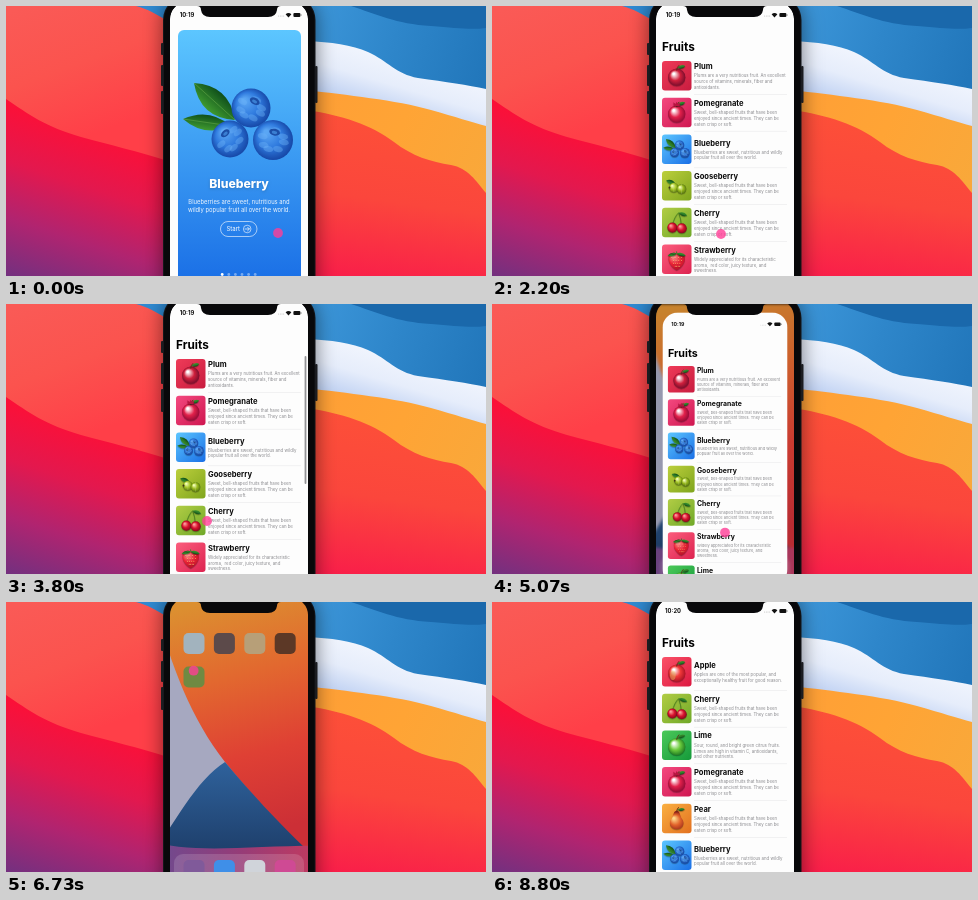
These frames come from a looping animation (480 px wide and 270 px high, 8.87 s). An HTML page with a canvas:

```html
<!DOCTYPE html>
<html lang="en">
<head>
<meta charset="utf-8">
<title>Fruits</title>
<style>
html, body { margin: 0; width: 100%; height: 100%; overflow: hidden; background: #111; }
canvas { display: block; width: 480px; height: 270px; }
</style>
</head>
<body>
<canvas id="stage"></canvas>
<script>
const W = 480, H = 270, LOOP = 8870;
const dpr = window.devicePixelRatio || 1;
const FONT = 'Inter, "Liberation Sans", sans-serif';
const stage = document.getElementById('stage');
const SCREEN = { x: 164, y: -4, w: 138, h: 300, r: 17 };
const MID = 233, ROW = 36.7, MAX_SCROLL = 235;

function layer(canvas, height) {
  canvas.width = W * dpr;
  canvas.height = height * dpr;
  const ctx = canvas.getContext('2d');
  ctx.scale(dpr, dpr);
  return ctx;
}
let c = layer(stage, H);
const main = c;

// ---------- timing ----------
const clamp = v => Math.max(0, Math.min(1, v));
const mix = (a, b, k) => a + (b - a) * k;
const inOut = k => k * k * (3 - 2 * k);
const span = (t, a, b) => clamp((t - a) / (b - a));
const glide = (t, a, b) => inOut(span(t, a, b));
const easeOut = (t, a, b) => 1 - Math.pow(1 - span(t, a, b), 3);

// keys: [time, value, value, ...]
function track(t, keys) {
  let i = 0;
  while (i < keys.length - 2 && t >= keys[i + 1][0]) i++;
  const a = keys[i], b = keys[i + 1], k = glide(t, a[0], b[0]);
  return a.slice(1).map((v, n) => mix(v, b[n + 1], k));
}

const PAGES = [[0, 0], [60, 0], [260, 82], [450, 140], [560, 140], [780, 222], [920, 280]];
const POINTER = [
  [60, 272, 227], [260, 192, 228], [310, 192, 228], [510, 272, 227], [560, 272, 227],
  [780, 192, 228], [1050, 192, 228], [1500, 229, 228], [2450, 229, 228], [2680, 224, 130],
  [3050, 205, 110], [3300, 201, 217], [4100, 201, 217], [4600, 233, 266], [4930, 233, 266],
  [5250, 233, 175], [5600, 226, 165], [5850, 224, 40], [6250, 224, 40], [6800, 186, 70], [8870, 186, 70]
];

// ---------- drawing helpers ----------
function ramp(x0, y0, x1, y1, ...cols) {
  const g = c.createLinearGradient(x0, y0, x1, y1);
  cols.forEach((col, i) => g.addColorStop(i / (cols.length - 1), col));
  return g;
}
function orb(x, y, r, ...cols) {
  const g = c.createRadialGradient(x - r * .35, y - r * .4, r * .1, x, y, r * 1.1);
  cols.forEach((col, i) => g.addColorStop(i / (cols.length - 1), col));
  return g;
}
function shape(d, fill) {
  c.fillStyle = fill;
  c.fill(new Path2D(d));
}
function line(d, color, width) {
  c.strokeStyle = color;
  c.lineWidth = width;
  c.lineCap = 'round';
  c.stroke(new Path2D(d));
}
function box(x, y, w, h, r, fill) {
  c.beginPath();
  c.roundRect(x, y, w, h, r);
  c.fillStyle = fill;
  c.fill();
}
function disc(x, y, r, fill, ry = r) {
  c.beginPath();
  c.ellipse(x, y, r, ry, 0, 0, 7);
  c.fillStyle = fill;
  c.fill();
}
function text(s, x, y, size, weight, color, align = 'left') {
  c.font = `${weight} ${size}px ${FONT}`;
  c.fillStyle = color;
  c.textAlign = align;
  c.textBaseline = 'middle';
  c.fillText(s, x, y);
}
function scoped(fn) {
  c.save();
  fn();
  c.restore();
}

// ---------- fruit ----------
function leaf(x0, y0, x1, y1, bulge, dark = '#0f4f1a', light = '#3f9a30') {
  const mx = (x0 + x1) / 2, my = (y0 + y1) / 2, dx = (y1 - y0) * bulge, dy = (x0 - x1) * bulge;
  shape(`M${x0} ${y0}Q${mx + dx} ${my + dy} ${x1} ${y1}Q${mx - dx} ${my - dy} ${x0} ${y0}`, ramp(mx + dx / 2, my + dy / 2, mx - dx / 2, my - dy / 2, light, dark));
  line(`M${x0} ${y0}L${x1} ${y1}`, 'rgba(150,210,100,.4)', .8);
}
function ball(col, dark, r = 36) {
  disc(0, 5, r, orb(0, 5, r, '#fff', col, dark));
  line('M0 -26Q2 -38 9 -44', '#5b3a1c', 4);
  leaf(4, -34, 36, -42, .45);
}
function berry(x, y, r, turn) {
  disc(x, y, r, orb(x, y, r, '#5aa6f4', '#2f7ade', '#123f9e'));
  scoped(() => {
    c.translate(x, y);
    c.rotate(turn);
    for (let i = 0; i < 7; i++) {
      const a = i * 2.4;
      disc(Math.cos(a) * r * .55, Math.sin(a) * r * .5, r * .25, 'rgba(110,180,248,.4)', r * .15);
    }
    disc(0, -r * .4, r * .27, '#1c4ea6', r * .17);
    disc(0, -r * .38, r * .14, '#3a7fd2', r * .08);
  });
}
const FRUIT = {
  Blueberry() {
    leaf(-4, -6, -45, -43, .4);
    leaf(-8, 0, -56, -7, .32);
    berry(12, -18, 19.5, .5);
    berry(-9, 13, 18.5, -.7);
    berry(34, 14, 20, .2);
  },
  Lemon() {
    disc(22, 33, 21, 'rgba(170,90,0,.22)', 7);
    shape('M13 -37C24 -36 32 -21 36 -8C42 12 37 30 24 37C17 40 14 39 9 40C5 39 0 39 -6 36C-19 29 -23 12 -18 -4C-13 -20 0 -35 13 -37Z',
      orb(10, 2, 40, '#ffd04a', '#ffb214', '#ea7c00'));
    disc(24, -14, 3.5, 'rgba(255,240,190,.6)', 6);
    line('M13 -37Q15 -41 14 -46', '#5a5a1c', 2.5);
    leaf(13, -38, -51, 14, .3, '#0b3d12', '#23752a');
  },
  Strawberry() {
    shape('M0 45C-25 32 -40 5 -32 -14C-24 -30 24 -30 32 -14C40 5 25 32 0 45Z', orb(0, 4, 42, '#ff8c8c', '#ec2436', '#a80a24'));
    for (let i = 0; i < 16; i++) disc((i % 4 - 1.5) * (14 - (i >> 2) * 2.6) + (i >> 2 & 1) * 3, -8 + (i >> 2) * 12, 1.5, '#ffd877', 2.2);
    [-38, -20, 0, 20, 38].forEach(x => leaf(0, -24, x, -16 - (40 - Math.abs(x)) * .5, .35));
  },
  Cherry() {
    line('M-18 10Q-10 -25 8 -42Q18 -20 20 14', '#3f7a1c', 3);
    leaf(8, -42, 44, -30, .4);
    disc(-18, 20, 21, orb(-18, 20, 21, '#ff9a9a', '#d8142e', '#77051a'));
    disc(21, 23, 21, orb(21, 23, 21, '#ff9a9a', '#d8142e', '#77051a'));
  },
  Gooseberry() {
    leaf(-4, -8, -44, -24, .4);
    disc(-12, 6, 20, orb(-12, 6, 20, '#f4ffb8', '#a9c927', '#597a10'));
    disc(20, 12, 20, orb(20, 12, 20, '#f4ffb8', '#98b91e', '#4d6d0c'));
    line('M-12 -12L-12 24M20 -6L20 30', 'rgba(240,255,190,.6)', 1.5);
    disc(-30, 6, 4, '#3d3416');
  },
  Pear() {
    shape('M0 -34C14 -34 13 -12 22 0C36 18 26 44 0 44C-26 44 -36 18 -22 0C-13 -12 -14 -34 0 -34Z', orb(0, 12, 36, '#ffd98a', '#e2632a', '#94261a'));
    line('M0 -32Q2 -42 7 -47', '#5b3a1c', 4);
    leaf(4, -38, 34, -40, .4);
  },
  Pomegranate() {
    ball('#e2214b', '#8c0733');
    shape('M-12 -28L-14 -44L-5 -36L0 -46L6 -36L14 -43L12 -28Z', '#b81440');
  },
  Plum() { ball('#d01f3c', '#6d0b2a'); },
  Apple() { ball('#f23a3a', '#a40d22'); disc(-16, 14, 12, 'rgba(255,214,110,.4)', 20); },
  Lime() { ball('#6ccb3d', '#17731f'); },
  Mango() { ball('#ffb52e', '#d85a16'); },
  Watermelon() { ball('#4fae3f', '#0d5420'); },
  Grapefruit() { ball('#ff8a5c', '#cf3a35'); }
};
const TINT = {
  Plum: ['#ef3b58', '#c81c3f'], Pomegranate: ['#f4497f', '#cf1650'], Blueberry: ['#5cc6ff', '#1a6fe6'],
  Gooseberry: ['#bccf3c', '#7fa51d'], Cherry: ['#b2cd45', '#6fa828'], Strawberry: ['#fb5d7d', '#dd2350'],
  Lime: ['#4cc95a', '#159a3a'], Lemon: ['#ffec38', '#ff9600'], Pear: ['#fab042', '#e2701f'],
  Apple: ['#fb5268', '#dc1840'], Mango: ['#ffc83d', '#f28a1c'], Watermelon: ['#6fcf68', '#1f9448'],
  Grapefruit: ['#ff9a77', '#ea4f4f']
};
const BELL = 'Sweet, bell-shaped fruits that have been|enjoyed since ancient times. They can be|eaten crisp or soft.';
const NOTE = {
  Plum: 'Plums are a very nutritious fruit. An excellent|source of vitamins, minerals, fiber and|antioxidants.',
  Blueberry: 'Blueberries are sweet, nutritious and wildly|popular fruit all over the world.',
  Strawberry: 'Widely appreciated for its characteristic|aroma,  red color, juicy texture, and|sweetness.',
  Apple: 'Apples are one of the most popular, and|exceptionally healthy fruit for good reason.',
  Lime: 'Sour, round, and bright green citrus fruits.|Limes are high in vitamin C, antioxidants,|and other nutrients.',
  Lemon: "There's no doubt lemons are delicious, but|does adding them to water make you|healthier?"
};
const CARDS = [
  ['Blueberry', 'Blueberries are sweet, nutritious and|wildly popular fruit all over the world.'],
  ['Strawberry', NOTE.Strawberry],
  ['Lemon', "There's no doubt lemons are delicious,|but does adding them to water make|you healthier?"]
];
const FIRST = ['Plum', 'Pomegranate', 'Blueberry', 'Gooseberry', 'Cherry', 'Strawberry', 'Lime',
  'Lemon', 'Pear', 'Apple', 'Mango', 'Watermelon', 'Grapefruit'];
const SECOND = ['Apple', 'Cherry', 'Lime', 'Pomegranate', 'Pear', 'Blueberry', 'Plum'];

// ---------- app ----------
function card([name, note], x, grow) {
  const lines = note.split('|'), tall = lines.length > 2;
  scoped(() => {
    c.translate(x, 0);
    box(172, 24, 123, 264, 6, ramp(0, 24, 0, 275, ...TINT[name]));
    scoped(() => {
      c.translate(MID, tall ? 117 : 120);
      c.scale(grow, grow);
      FRUIT[name]();
    });
    scoped(() => {
      c.shadowColor = 'rgba(0,0,0,.2)';
      c.shadowBlur = 3 * dpr;
      c.shadowOffsetY = dpr;
      text(name, MID, tall ? 174 : 178, 12.2, 800, '#fff', 'center');
    });
    lines.forEach((s, i) => text(s, MID, (tall ? 192.3 : 196.5) + i * 8, 5.85, 400, 'rgba(255,255,255,.92)', 'center'));
    const y = tall ? 227 : 223;
    c.beginPath();
    c.roundRect(214.5, y - 7.5, 36.5, 15, 7.5);
    c.strokeStyle = '#fff';
    c.lineWidth = .6;
    c.stroke();
    text('Start', 220.5, y + .2, 6, 400, '#fff');
    c.beginPath();
    c.arc(241.2, y, 3.8, 0, 7);
    c.stroke();
    line(`M239 ${y}H243.3M241.6 ${y - 1.8}L243.4 ${y}L241.6 ${y + 1.8}`, '#fff', .7);
  });
}

function onboarding(t) {
  const shift = track(t, PAGES)[0];
  const grow = [1, mix(.6, 1, easeOut(t, 60, 460)), mix(.6, 1, easeOut(t, 520, 900))];
  CARDS.forEach((item, i) => {
    const x = i * 140 - shift;
    if (Math.abs(x) < 140) card(item, x, grow[i]);
  });
  const active = Math.round(shift / 140);
  for (let i = 0; i < 6; i++) disc(216.2 + i * 6.6, 268.5, 1.4, i === active ? '#fff' : 'rgba(255,255,255,.4)');
}

function row(name, mid) {
  scoped(() => {
    box(170, mid - 15, 29.5, 29.5, 3, ramp(170, mid - 15, 199, mid + 15, ...TINT[name]));
    c.translate(184.7, mid);
    c.scale(.24, .24);
    c.shadowColor = 'rgba(0,0,0,.3)';
    c.shadowBlur = dpr;
    c.shadowOffsetY = dpr;
    FRUIT[name]();
  });
  const lines = (NOTE[name] || BELL).split('|'), tall = lines.length > 2;
  text(name, 202, mid - (tall ? 9.2 : 6), 7.6, 700, '#0b0b0b');
  lines.forEach((s, i) => text(s, 202, mid + (tall ? 0 : 2.8) + i * 5.8, 4.35, 400, '#8a8a8e'));
  c.fillStyle = '#e4e4e6';
  c.fillRect(202, mid + 18.2, 93, .5);
}

function list(names, scroll, bar) {
  text('Fruits', 170, 41.3 - scroll, 11.8, 700, '#000');
  names.forEach((name, i) => {
    const mid = 70 + i * ROW - scroll;
    if (mid > -25 && mid < 300) row(name, mid);
  });
  const nav = span(scroll, 8, 20);
  if (nav) {
    scoped(() => {
      c.globalAlpha *= nav;
      c.fillStyle = '#f8f8f9';
      c.fillRect(164, -4, 138, 37);
      c.fillStyle = '#d0d0d2';
      c.fillRect(164, 33, 138, .5);
      text('Fruits', MID, 25, 6, 600, '#000', 'center');
    });
  }
  if (bar) box(298.6, 52 + scroll / MAX_SCROLL * 105, 1.8, 128, .9, `rgba(90,90,95,${.65 * bar})`);
}

function status(t) {
  text(t < 6000 ? '10:19' : '10:20', 181, 9.2, 5.8, 700, '#111', 'center');
  for (let i = 0; i < 4; i++) disc(272.6 + i * 1.7, 10, .5, '#bbb');
  shape('M282.5 11.4L279.6 8.2Q282.5 5.6 285.4 8.2Z', '#111');
  box(287.4, 7, 7, 4, 1.1, '#111');
  box(294.8, 8.3, .7, 1.5, .3, '#777');
}

function app(t) {
  c.fillStyle = '#fdfdfd';
  c.fillRect(SCREEN.x, SCREEN.y, SCREEN.w, SCREEN.h);
  if (t < 1950) onboarding(t);
  else if (t < 6500) {
    const scroll = MAX_SCROLL * (easeOut(t, 2450, 3080) - easeOut(t, 3100, 3700));
    list(FIRST, scroll, span(t, 2450, 2520) * (1 - span(t, 4150, 4400)));
  } else if (t > 7850) list(SECOND, 0, 0);
  status(t);
}

// app window shrunk to a given centre, scale and opacity
function appWindow(t, x, y, k, alpha = 1) {
  scoped(() => {
    c.globalAlpha = alpha;
    c.translate(x, y);
    c.scale(k, k);
    c.translate(-MID, -146);
    c.beginPath();
    c.roundRect(SCREEN.x, SCREEN.y, SCREEN.w, SCREEN.h, SCREEN.r);
    c.clip();
    app(t);
  });
}

// ---------- home screen ----------
function paintHome() {
  c.fillStyle = ramp(200, 0, 260, 230, '#dc8f30', '#e2682f', '#df4034', '#cc2f36');
  c.fillRect(0, 0, W, 310);
  shape('M146 -10C163 60 184 115 219 160C245 192 272 222 300 248L300 310H140Z', '#a6a8c0');
  shape('M140 262C168 222 190 178 219 160C244 190 272 220 300 247V310H140Z', ramp(0, 160, 0, 245, '#2f629c', '#1f416e'));
  shape('M140 238C190 254 250 242 330 244V310H140Z', ramp(164, 0, 302, 0, '#74488c', '#953c78', '#bd3a62'));
  ['#a2b3be', '#5c4a4a', '#b79f78', '#5c3826'].forEach((col, i) => box(177.5 + i * 30.4, 31, 21, 21, 5, col));
  box(177.5, 64.5, 21, 21, 5, '#6f8a42');
  box(168, 252, 130, 40, 9, 'rgba(255,255,255,.14)');
  ['#805a9a', '#3f8fe8', '#d0d4da', '#cf4a94'].forEach((col, i) => box(177.5 + i * 30.4, 258, 21, 21, 5, col));
}

function drawHome(t) {
  const fog = glide(t, 4950, 5200) * (1 - glide(t, 6050, 6450));
  scoped(() => {
    c.filter = fog > .01 ? `blur(${fog * 3.8 * dpr}px)` : 'none';
    c.drawImage(home, 0, 0, W, 310);
  });
  c.fillStyle = `rgba(20,22,26,${.22 * fog})`;
  c.fillRect(SCREEN.x, SCREEN.y, SCREEN.w, SCREEN.h);
}

// ---------- backdrop and phone ----------
function paintBackdrop() {
  c.fillStyle = ramp(20, 0, 70, 135, '#fa5a56', '#fb534e', '#ff3f48');
  c.fillRect(0, 0, 240, H);
  shape('M0 93C22 108 40 121 75 131C105 139 130 145 165 156V270H0Z', ramp(100, 130, 50, 285, '#fb1038', '#e3184e', '#b02470', '#74307f'));
  shape('M130 0C142 3 150 8 165 17V0Z', '#2f8ad2');
  c.fillStyle = ramp(300, 0, 480, 60, '#3d97da', '#2e86ca', '#2277bb');
  c.fillRect(240, 0, 240, H);
  shape('M345 0C370 8 390 18 425 20C450 22 465 24 480 22V0Z', '#1a68ab');
  shape('M300 35C325 36 346 39 362 46C382 55 390 68 412 72C440 76 462 79 480 83V150H300Z', ramp(395, 45, 375, 112, '#f4f7fe', '#e6edfb', '#b4c9f0'));
  shape('M300 84C340 89 390 94 425 104C450 111 465 116 480 120V200H300Z', ramp(300, 90, 480, 170, '#ff9f36', '#ffa435', '#f9a83a'));
  shape('M300 104C335 109 366 119 388 136C406 150 425 156 445 159C462 162 470 175 480 187V270H300Z', ramp(400, 110, 375, 282, '#fd5038', '#fb463c', '#f91c4a'));
  scoped(() => {
    c.shadowColor = 'rgba(0,0,0,.5)';
    c.shadowBlur = 20 * dpr;
    box(157, -10, 152.5, 320, 24, '#15161a');
  });
  [[155, 37, 12], [155, 59, 21], [155, 85, 23], [309, 60, 37]].forEach(([x, y, h]) => box(x, y, 2.5, h, 1, '#1b1c20'));
  box(158, -9, 150.5, 318, 23, '#08080a');
}

function offscreen(paint, height) {
  const canvas = document.createElement('canvas');
  c = layer(canvas, height);
  paint();
  c = main;
  return canvas;
}
const backdrop = offscreen(paintBackdrop, H);
const home = offscreen(paintHome, 310);

function drawScreen(t) {
  if (t < 4950 || t >= 7400) return appWindow(t, MID, 146, 1);
  drawHome(t);
  if (t < 6000) {
    const shrink = glide(t, 4950, 5300), fly = glide(t, 5600, 5900);
    appWindow(t, MID, mix(146, 140, shrink) - fly * 260, mix(1, .66, shrink));
  } else if (t > 7000) {
    const k = easeOut(t, 7000, 7400);
    appWindow(t, mix(188, MID, k), mix(75, 146, k), mix(.08, 1, k), span(t, 7000, 7080));
  }
}

function draw(t) {
  c.drawImage(backdrop, 0, 0, W, H);
  scoped(() => {
    c.beginPath();
    c.roundRect(SCREEN.x, SCREEN.y, SCREEN.w, SCREEN.h, SCREEN.r);
    c.clip();
    drawScreen(t);
  });
  shape('M191 -1V0Q195 0 195 4Q196 11 204 11H262Q270 11 271 4Q271 0 275 0V-1Z', '#08080a');
  const [x, y] = track(t, POINTER);
  scoped(() => {
    c.globalAlpha = .8 * (1 - span(t, 8250, 8450));
    disc(x, y, 4.9, '#ff3d96');
  });
}

const start = performance.now();
function loop(now) {
  draw(Math.max(0, now - start) % LOOP);
  requestAnimationFrame(loop);
}
loop(start);
</script>
</body>
</html>
```
